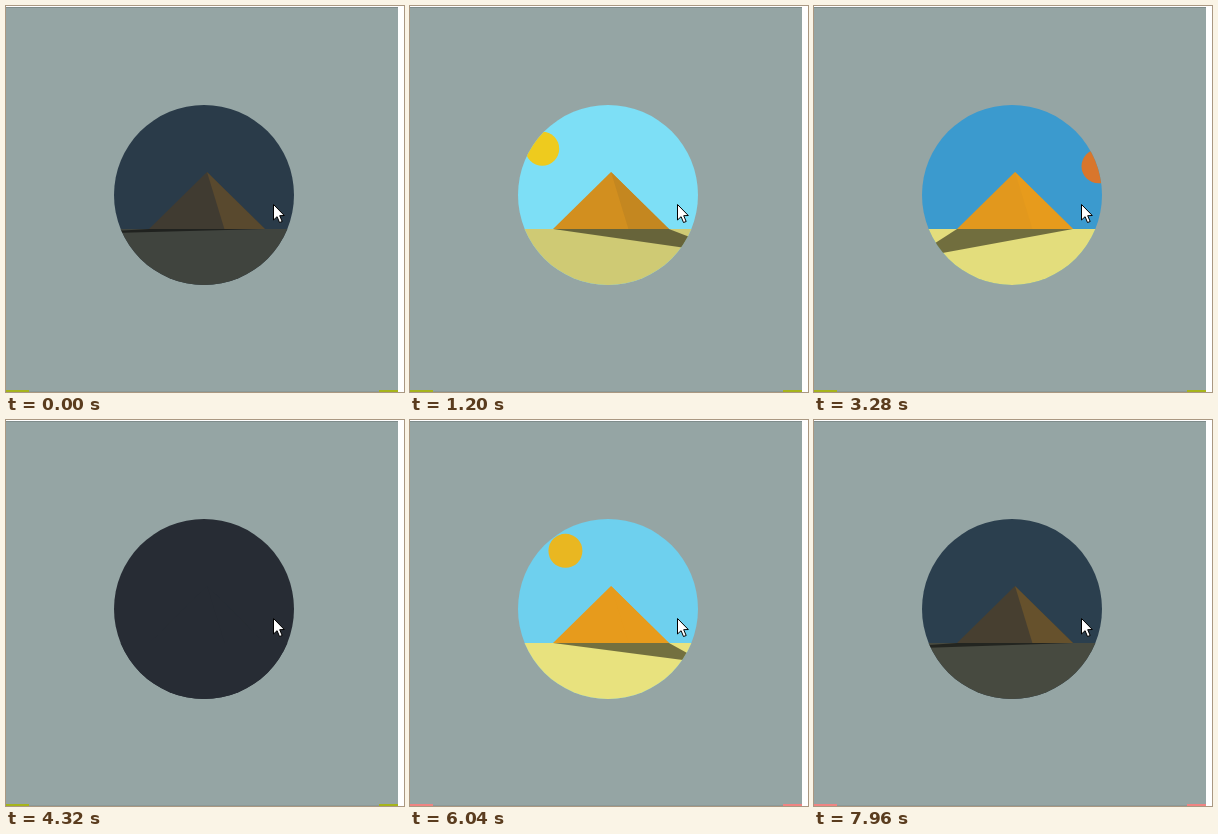
An HTML page with a canvas for the animation above (8000 ms loop, 398x386 px).

```html
<!DOCTYPE html>
<html lang="en">
<head>
<meta charset="utf-8">
<title>Pyramid day and night</title>
<style>
  html, body { margin: 0; width: 100%; height: 100%; overflow: hidden; background: #fff; }
  canvas { display: block; width: 398px; height: 386px; }
</style>
</head>
<body>
<canvas id="stage"></canvas>
<script>
const W = 398, H = 386, LOOP = 8000, DAY = 4000, DAWN = 350;
const canvas = document.getElementById('stage');
const ctx = canvas.getContext('2d');
const ratio = window.devicePixelRatio || 1;
canvas.width = W * ratio;
canvas.height = H * ratio;
ctx.scale(ratio, ratio);

const CX = 198, CY = 189, R = 90, HORIZON = 223;
const NIGHT = [39, 44, 52];
const STONE = [231, 155, 28];
const SAND = [232, 226, 126];
const MORNING = [125, 223, 246];
const EVENING = [60, 157, 210];
const SUN_HIGH = [238, 203, 30];
const SUN_LOW = [217, 118, 44];

// Tracks are lists of [share of the day, value].
const sky = [[0, NIGHT], [.2, MORNING], [.3, MORNING], [.7, EVENING], [1, NIGHT]];
const sand = [[0, NIGHT], [.3, SAND], [.7, SAND], [1, NIGHT]];
const leftSide = [[0, NIGHT], [.29, STONE], [.7, STONE], [1, NIGHT]];
const rightSide = [[0, NIGHT], [.32, STONE], [.78, STONE], [1, NIGHT]];
const sunColor = [[0, SUN_HIGH], [.3, SUN_HIGH], [.7, SUN_LOW], [1, SUN_LOW]];
const sunAngle = [[0, -70], [.3, -28], [1, 70]];
const shadowTip = [[0, 1], [.3, .8], [1, 0]];
const shadowScale = [[0, 0], [.3, 1], [.55, .4], [.75, 1], [1, 0]];

// cubic-bezier(.4, 0, .49, 1)
function ease(x) {
  let lo = 0, hi = 1;
  for (let i = 0; i < 24; i++) {
    const u = (lo + hi) / 2, v = 1 - u;
    if (1.2 * u * v * v + 1.47 * u * u * v + u * u * u < x) lo = u;
    else hi = u;
  }
  return lo * lo * (3 - 2 * lo);
}

function sample(track, p) {
  let i = 1;
  while (i < track.length - 1 && p > track[i][0]) i++;
  const [p0, a] = track[i - 1], [p1, b] = track[i];
  const k = ease((p - p0) / (p1 - p0));
  const mix = (m, n) => m + (n - m) * k;
  return Array.isArray(a) ? a.map((c, j) => mix(c, b[j])) : mix(a, b);
}

const rgb = (track, p) => `rgb(${sample(track, p).map(Math.round).join()})`;

function rect(x, y, w, h, fill) {
  ctx.fillStyle = fill;
  ctx.fillRect(x, y, w, h);
}

function disc(x, y, r, fill) {
  ctx.beginPath();
  ctx.arc(x, y, r, 0, Math.PI * 2);
  ctx.fillStyle = fill;
  ctx.fill();
}

function polygon(points, fill) {
  ctx.beginPath();
  points.forEach(([x, y]) => ctx.lineTo(x, y));
  ctx.closePath();
  ctx.fillStyle = fill;
  ctx.fill();
}

function drawPage(t) {
  rect(0, 0, W, H, '#fff');
  rect(0, 1, 392, 385, '#95a5a4');
  rect(0, 1, 392, 1, '#7f8c8b');
  rect(0, 385, 392, 1, '#8b9998');
  const corner = t < 5160 ? '#a6b41c' : '#ee8482';
  rect(0, 384, 23, 2, corner);
  rect(373, 384, 19, 2, corner);
}

function drawScene(p) {
  disc(CX, CY, R, rgb(sky, p));
  ctx.save();
  ctx.beginPath();
  ctx.arc(CX, CY, R, 0, Math.PI * 2);
  ctx.clip();

  const a = sample(sunAngle, p) * Math.PI / 180;
  disc(CX + 119 * Math.sin(a), 242 - 119 * Math.cos(a), 17, rgb(sunColor, p));
  rect(CX - R, HORIZON, 2 * R, 56, rgb(sand, p));
  polygon([[143, HORIZON], [259, HORIZON], [201, 166]], rgb(leftSide, p));
  polygon([[218.4, HORIZON], [259, HORIZON], [201, 166]], rgb(rightSide, p));

  const tip = [28 + 360 * sample(shadowTip, p), HORIZON + 30 * sample(shadowScale, p)];
  polygon([[143, HORIZON], [259, HORIZON], tip], 'rgba(0,0,0,.5)');
  ctx.restore();
}

function drawCursor() {
  ctx.save();
  ctx.translate(267.5, 198.5);
  polygon([[0, 0], [0, 15.5], [3.6, 12.2], [6, 18], [8.7, 17], [6.2, 11.2], [10.8, 11]], '#fff');
  ctx.strokeStyle = '#000';
  ctx.lineWidth = 1;
  ctx.stroke();
  ctx.restore();
}

function draw(now) {
  const t = now % LOOP;
  drawPage(t);
  drawScene(((t - DAWN + DAY) % DAY) / DAY);
  drawCursor();
}

let start = null;
function tick(now) {
  if (start === null) start = now;
  draw(now - start);
  requestAnimationFrame(tick);
}
draw(0);
requestAnimationFrame(tick);
</script>
</body>
</html>
```
